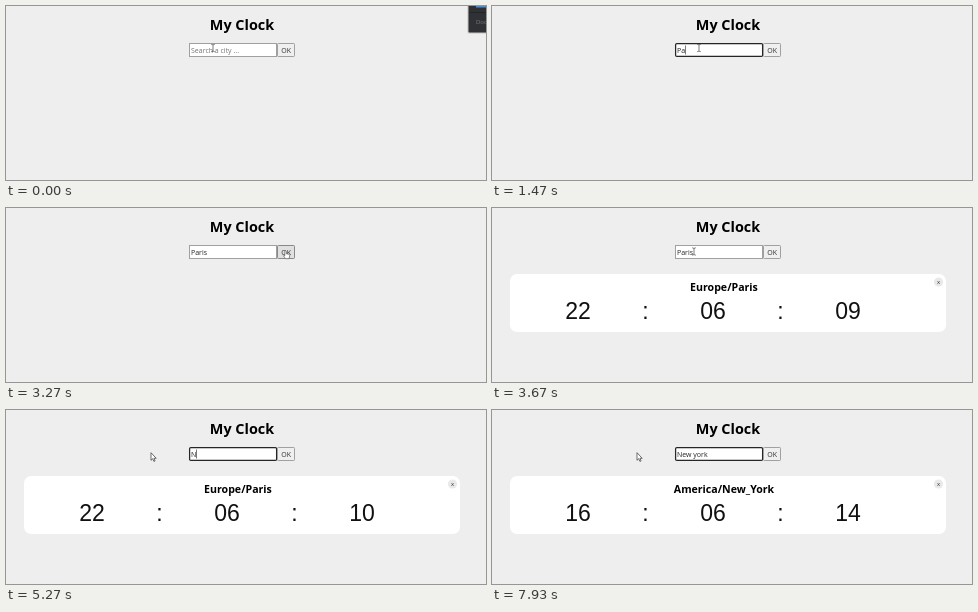
Recreate the animation shown at these times as an HTML page. Size 480 by 174 pixels, loop 8 s.

```html
<!DOCTYPE html>
<html lang="en">
<head>
<meta charset="utf-8">
<title>My Clock</title>
<style>
  html, body { margin: 0; width: 100%; height: 100%; overflow: hidden; background: #eee; }
  svg { display: block; width: 480px; height: 174px; font-family: "Open Sans", sans-serif; }
  text { white-space: pre; }
  .mid { text-anchor: middle; }
  .bold { font-weight: 700; }
  .small { font-size: 7px; }
  .digits { font: 23px "Liberation Sans", Arial, sans-serif; fill: #111; }
</style>
</head>
<body>
<svg viewBox="0 0 480 174">
  <text class="mid bold" x="236" y="24.3" font-size="14.4">My Clock</text>

  <rect id="field" fill="#fff"/>
  <rect id="selection" y="39" height="10" fill="#1a73d8"/>
  <text class="small" x="185" y="47"><tspan id="plain"></tspan><tspan id="picked" fill="#fff"></tspan></text>
  <rect id="caret" y="39.5" width=".6" height="9" fill="#222"/>

  <rect id="button" x="271.5" y="37.5" width="17" height="13" rx=".8"/>
  <text class="mid small" x="280.2" y="47" fill="#333">OK</text>

  <g id="card">
    <rect x="18" y="66" width="436" height="58" rx="7" fill="#fff"/>
    <text id="zone" class="mid bold" x="232" y="83" font-size="10.6"></text>
    <g id="clock" class="mid digits"></g>
    <circle cx="446.5" cy="74" r="4.6" fill="#e9e9e9"/>
    <text class="mid" x="446.5" y="76" font-size="6" fill="#333">x</text>
  </g>

  <g id="panel">
    <rect x="461.5" y="-2" width="20" height="29.5" rx="1.5" fill="#000" opacity=".18"/>
    <rect x="462.5" y="-2" width="20" height="28.5" rx="1" fill="#303134"/>
    <rect x="463" y="6" width="17" height="1" fill="#232427"/>
    <rect x="470" y="0" width="10" height="1.5" fill="#4a8fd8"/>
    <text x="470" y="18" font-size="6" fill="#77797d">Doc</text>
  </g>

  <path id="beam" d="M-1.8-3.7Q0-3.7 0-2.7Q0-3.7 1.8-3.7M0-2.7V2.7M-1.8 3.7Q0 3.7 0 2.7Q0 3.7 1.8 3.7"
        fill="none" stroke="#444" stroke-width=".7"/>
  <path id="arrow" d="M0 0V7.6L1.7 6L2.9 8.7L4.1 8.2L2.9 5.6H5.2Z"
        fill="#fff" stroke="#333" stroke-width=".7"/>
  <path id="hand" d="M-.7 5V.6Q0-.5.7.6V3L3.6 3.6Q4.4 3.9 4.2 5L3.6 8H0L-2 5.2Q-1.9 4.2-.7 5Z"
        fill="#fff" stroke="#444" stroke-width=".6"/>
</svg>
<script>
const LOOP = 8000;
const $ = id => document.getElementById(id);
const set = (id, attrs) => {
  for (const name in attrs) $(id).setAttribute(name, attrs[name]);
};
const show = (id, on) => set(id, { visibility: on ? 'visible' : 'hidden' });

// [time, field content]; the caret blink restarts at each entry
const typing = [
  [0, ''], [390, ''], [1070, 'P'], [1400, 'Pa'], [1530, 'Par'], [1670, 'Pari'], [1800, 'Paris'],
  [4930, ''], [5270, 'N'], [5400, 'Ne'], [5670, 'New'], [6070, 'New '], [6130, 'New y'],
  [6270, 'New yo'], [6400, 'New yor'], [7070, 'New york']
];
// [time, number of characters selected from the end]
const selecting = [[0, 0], [4130, 1], [4200, 2], [4270, 4], [4330, 5], [4930, 0]];
// [time, zone, hours, minutes, seconds]
const readings = [
  [0, '', '', '', ''],
  [3670, 'Europe/Paris', '22', '06', '09'],
  [4670, 'Europe/Paris', '22', '06', '10'],
  [7930, 'America/New_York', '16', '06', '14']
];
// [time, x, y]
const pointer = [
  [0, 207, 42], [2330, 207, 42], [2650, 245, 51.2], [3050, 279.5, 42.7], [3330, 279.5, 42.7],
  [3670, 202, 43.5], [4070, 201, 43.5], [4200, 190, 43.5], [4330, 145, 42.7], [LOOP, 145, 42.7]
];

const latest = (steps, t) => steps.findLast(step => step[0] <= t);

function pointerAt(t) {
  const next = pointer.findIndex(p => p[0] > t);
  const [t0, x0, y0] = pointer[next - 1], [t1, x1, y1] = pointer[next];
  const u = (t - t0) / (t1 - t0), k = u * u * (3 - 2 * u);
  return [x0 + (x1 - x0) * k, y0 + (y1 - y0) * k];
}

const cells = Array.from({ length: 5 }, (_, i) => {
  const cell = document.createElementNS('http://www.w3.org/2000/svg', 'text');
  cell.setAttribute('x', 86 + 67.5 * i);
  cell.setAttribute('y', 111);
  return $('clock').appendChild(cell);
});

function drawField(t) {
  const focused = t >= 390 && t < 3070 || t >= 4070;
  const [since, value] = latest(typing, t);
  const count = latest(selecting, t)[1];
  const split = value.length - count;

  set('field', focused
    ? { x: 183.6, y: 37.6, width: 87, height: 12.8, rx: 1.2, stroke: '#262626', 'stroke-width': 1.25 }
    : { x: 183.5, y: 37.5, width: 87, height: 13, rx: 0, stroke: '#a0a0a0', 'stroke-width': 1 });
  $('plain').textContent = value ? value.slice(0, split) : 'Search a city ...';
  $('picked').textContent = value.slice(split);
  set('plain', { fill: value ? '#222' : '#757575' });

  const before = value ? $('plain').getComputedTextLength() : 0;
  set('selection', { x: 185 + before, width: count ? $('picked').getComputedTextLength() : 0 });
  set('caret', { x: 185 + before });
  show('caret', focused && !count && Math.floor((t - since) / 500) % 2 === 0);
}

function drawClock(t) {
  const [, zone, h, m, s] = latest(readings, t);
  show('card', zone);
  $('zone').textContent = zone;
  [h, ':', m, ':', s].forEach((part, i) => cells[i].textContent = part);
}

function drawPointer(t) {
  const [x, y] = pointerAt(t);
  const inRow = y > 37 && y < 51;
  const overField = inRow && x > 183 && x < 271;
  const overButton = inRow && x >= 271 && x < 289;
  for (const id of ['beam', 'arrow', 'hand']) set(id, { transform: `translate(${x} ${y})` });
  show('beam', overField);
  show('hand', overButton);
  show('arrow', !overField && !overButton);
  set('button', {
    fill: overButton ? '#e0e0e0' : '#efefef',
    stroke: overButton ? '#888' : '#a0a0a0'
  });
}

function frame() {
  const t = performance.now() % LOOP;
  set('panel', { opacity: Math.max(0, Math.min(1, (500 - t) / 170)) });
  drawField(t);
  drawClock(t);
  drawPointer(t);
  requestAnimationFrame(frame);
}
frame();
</script>
</body>
</html>
```
